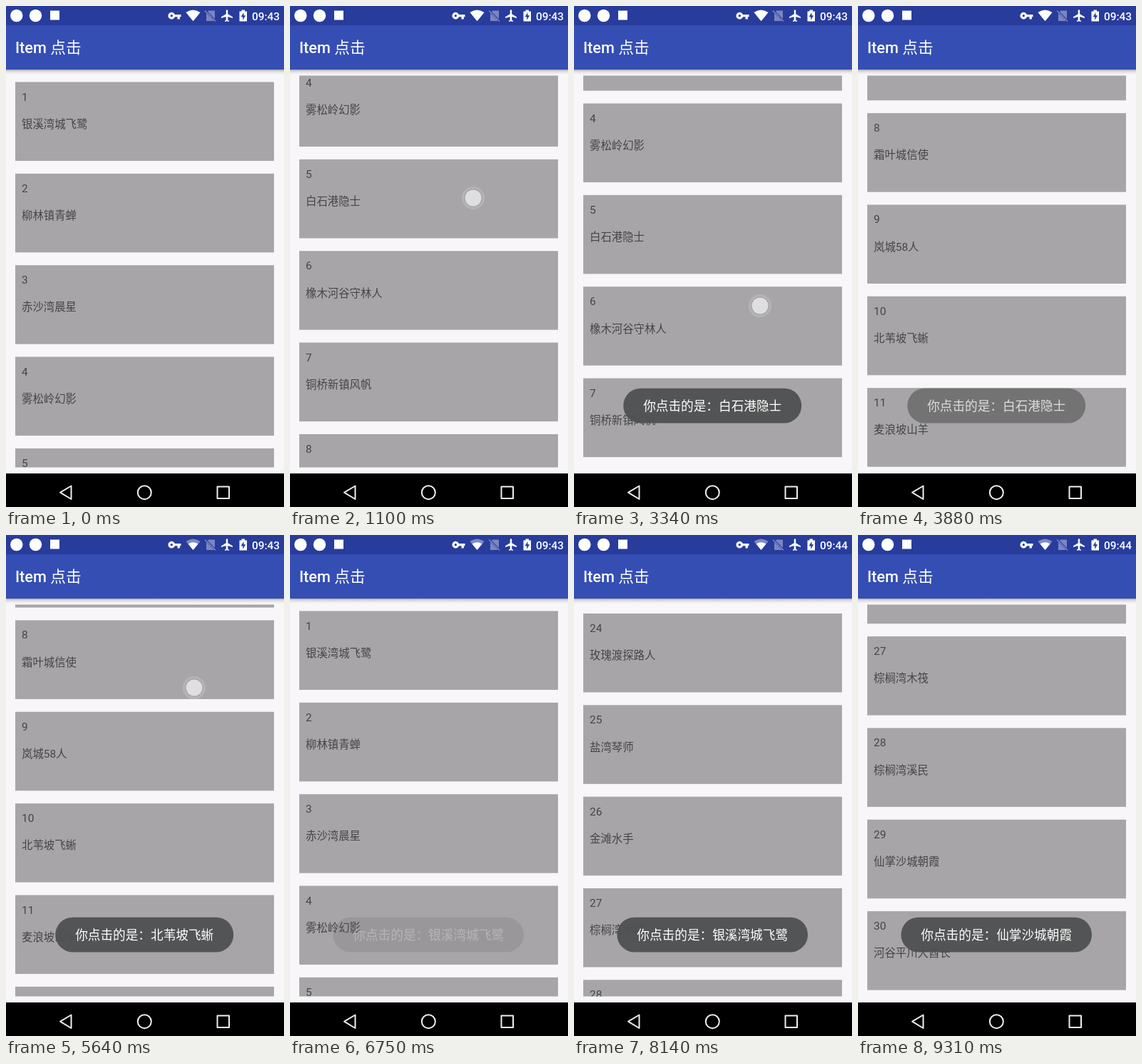
Write an HTML page that moves like this. It is 390x702 px and loops after 9690 ms.

```html
<!DOCTYPE html>
<html lang="zh-CN">
<head>
<meta charset="utf-8">
<title>Item 点击</title>
<style>
  html, body { margin: 0; width: 100%; height: 100%; overflow: hidden; background: #f8f6f9; }
  #stage { display: block; width: 390px; height: 702px; }
  text { font-family: Roboto, "Noto Sans CJK SC", "Noto Sans CJK", sans-serif; }
  .card { fill: #a7a5a8; }
  .label { font-size: 15.4px; fill: #454446; }
  .title { font-size: 21.7px; fill: #fff; }
  .title .latin, .clock { font-weight: 500; }
  .clock { font-size: 15.4px; text-anchor: end; }
  .say { font-size: 17.65px; fill: #fff; text-anchor: middle; }
  .nav { fill: none; stroke: #eee; stroke-width: 2; stroke-linejoin: round; }
</style>
</head>
<body>
<svg id="stage" viewBox="0 0 390 702" xmlns="http://www.w3.org/2000/svg">
  <defs>
    <clipPath id="view"><rect y="97.5" width="390" height="549"/></clipPath>
    <linearGradient id="shade" x2="0" y2="1">
      <stop offset="0" stop-color="#000" stop-opacity=".32"/>
      <stop offset=".4" stop-color="#000" stop-opacity=".1"/>
      <stop offset="1" stop-color="#000" stop-opacity="0"/>
    </linearGradient>
  </defs>

  <rect width="390" height="702" fill="#f8f6f9"/>
  <g clip-path="url(#view)"><g id="list"></g></g>

  <rect y="89" width="390" height="7" fill="url(#shade)"/>
  <rect width="390" height="89" fill="#344eb4"/>
  <rect width="390" height="27" fill="#283c9c"/>
  <text class="title" x="13" y="66"><tspan class="latin">Item</tspan> 点击</text>

  <g fill="#fff">
    <circle cx="14.8" cy="13.5" r="8.7"/>
    <circle cx="41.5" cy="13.5" r="8.7"/>
    <rect x="62" y="6.5" width="13" height="13"/>
    <path transform="translate(226.6 3.8) scale(.82)" fill-rule="evenodd"
      d="M12.65 10a6 6 0 1 0 0 4H17v4h4v-4h2v-4zM7 14a2 2 0 1 1 0-4 2 2 0 0 1 0 4z"/>
    <path id="wifi" d="M262.5 21L252.5 9Q262.5 2 272.5 9Z"/>
    <path d="M262.5 21L255.5 12.6Q262.5 8 269.5 12.6Z"/>
    <g opacity=".38">
      <path d="M284 6.5h9v11.5l-10-10zM281 10l11 11h-11z"/>
      <path d="M279 6.5L294 21.5" stroke="#fff" stroke-width="1.5"/>
    </g>
    <path transform="translate(300.3 3.6) scale(.84)"
      d="M21 16v-2l-8-5V3.5a1.5 1.5 0 0 0-3 0V9l-8 5v2l8-2.5V19l-2 1.5V22l3.5-1 3.5 1v-1.5L13 19v-5.5z"/>
    <path d="M327.5 7.5h3v-2h4.500v2h3v14h-10.500z"/>
    <path d="M333.500 9l-4 6.300h2.700v4.500l4-6.500h-2.700z" fill="#283c9c"/>
    <text id="clock" class="clock" x="384" y="19.5"></text>
  </g>

  <g id="toast">
    <rect id="pill" y="535.7" height="48.800" rx="24.400" fill="#505151" fill-opacity=".95"/>
    <text id="say" class="say" x="194.2" y="566.7"></text>
  </g>

  <g id="touch">
    <circle r="16" fill="#fff" fill-opacity=".17"/>
    <circle r="12.700" fill="#8f8d9a" fill-opacity=".55"/>
    <circle r="11.500" fill="#dfdee1"/>
  </g>

  <rect y="655" width="390" height="47" fill="#000"/>
  <g class="nav">
    <path d="M91.500 672.500v18.500L76 681.700z"/>
    <circle cx="194.300" cy="681.700" r="9.500"/>
    <rect x="296.500" y="673.500" width="16.500" height="16.500"/>
  </g>
</svg>

<script>
const LOOP = 9690, TOP = 106.5, PITCH = 128.35, END = 3301.5;
const teams = `银溪湾城飞鹭 柳林镇青蝉 赤沙湾晨星 雾松岭幻影 白石港隐士 橡木河谷守林人
  铜桥新镇风帆 霜叶城信使 岚城58人 北苇坡飞蜥 麦浪坡山羊 灰崖古堡卫兵 铁炉镇齿轮
  长原四野漫游者 湖畔木屋麋鹿 旱谷城花豹 晴川港飞梭 蓝藤镇棕獾 新苇河口白鹳
  圣榆林堡垒铜铃 岩城矿工 千泉雪原赤尾狐 红土高坡大旋风 玫瑰渡探路人 盐湾琴师
  金滩水手 棕榈湾木筏 棕榈湾溪民 仙掌沙城朝霞 河谷平川大酋长`.split(/\s+/);

const $ = id => document.getElementById(id);
const clamp = x => Math.min(1, Math.max(0, x));
const easeOut = p => 1 - (1 - p) ** 3;
const power = n => p => p ** n;

$('list').innerHTML = teams.map((name, i) => `
  <g transform="translate(13 ${TOP + i * PITCH})">
    <rect class="card" width="363" height="110.5"/>
    <text class="label" x="9" y="26">${i + 1}</text>
    <text class="label" x="9" y="64.3">${name}</text>
  </g>`).join('');

// The screen refreshes in bursts: start, end, number of refreshes
const ticks = [
  [150, 780, 9], [1030, 1950, 13], [2020, 2100, 2], [3340, 4180, 12], [4410, 4880, 7],
  [5640, 5960, 5], [6420, 7070, 9], [7450, 8220, 11], [8590, 8590, 1], [8760, 9080, 5]
].flatMap(([a, b, n]) => Array.from({ length: n }, (_, i) => a + (b - a) * i / Math.max(1, n - 1)));

// start, end, from, to, easing
const scrolls = [
  [170, 780, 0, 405, easeOut],
  [1110, 1420, 405, 355, easeOut],
  [3390, 4180, 355, 885.5, easeOut],
  [5640, 5960, 885.5, 0, power(1.2)],
  [7450, 8220, 0, END, power(1.073)]
];

// start, end, x, y; a dragging finger moves with the list
const touches = [
  [150, 420, 258, 480], [1030, 1400, 257, 269], [1600, 1760, 252, 318],
  [3340, 3600, 261, 420], [4410, 4600, 196, 430], [5640, 5780, 264, 214],
  [6420, 6570, 208, 160], [7450, 7590, 262, 540], [8590, 8830, 207.5, 464.5]
];

// fade in, its length, fade out, its length, row
const toasts = [
  [1700, 400, 3760, 300, 5],
  [4480, 400, 6460, 200, 10],
  [6680, 390, LOOP, 1, 1],
  [8755, 1, LOOP, 1, 29]
];

function scrollAt(t) {
  const s = scrolls.filter(s => s[0] <= t).pop();
  if (!s) return 0;
  const [a, b, from, to, ease] = s;
  return from + (to - from) * ease(clamp((t - a) / (b - a)));
}

function drawTouch(t, scroll) {
  const hit = touches.find(([a, b]) => t >= a && t < b);
  $('touch').style.display = hit ? '' : 'none';
  if (!hit) return;
  const [a, , x, y] = hit;
  $('touch').setAttribute('transform', `translate(${x} ${y + scrollAt(a) - scroll})`);
}

function drawToast(t) {
  const toast = toasts.filter(s => s[0] <= t).pop();
  $('toast').style.display = toast ? '' : 'none';
  if (!toast) return;
  const [a, rise, b, fall, row] = toast;
  const name = teams[row - 1], width = 250 + (name.length - 5) * 17.65;
  $('toast').setAttribute('opacity', clamp((t - a) / rise) * (1 - clamp((t - b) / fall)));
  $('pill').setAttribute('x', 194.2 - width / 2);
  $('pill').setAttribute('width', width);
  $('say').textContent = '你点击的是：' + name;
}

const born = performance.now();

function draw() {
  const now = (performance.now() - born) % LOOP;
  const t = ticks.filter(k => k <= now + 8).pop() || 0;
  const scroll = scrollAt(t);
  $('list').setAttribute('transform', `translate(0 ${-scroll})`);
  $('clock').textContent = t < 6900 ? '09:43' : '09:44';
  $('wifi').setAttribute('opacity', t < 4500 ? 1 : 0.4);
  drawTouch(t, scroll);
  drawToast(t);
  requestAnimationFrame(draw);
}
draw();
</script>
</body>
</html>
```
